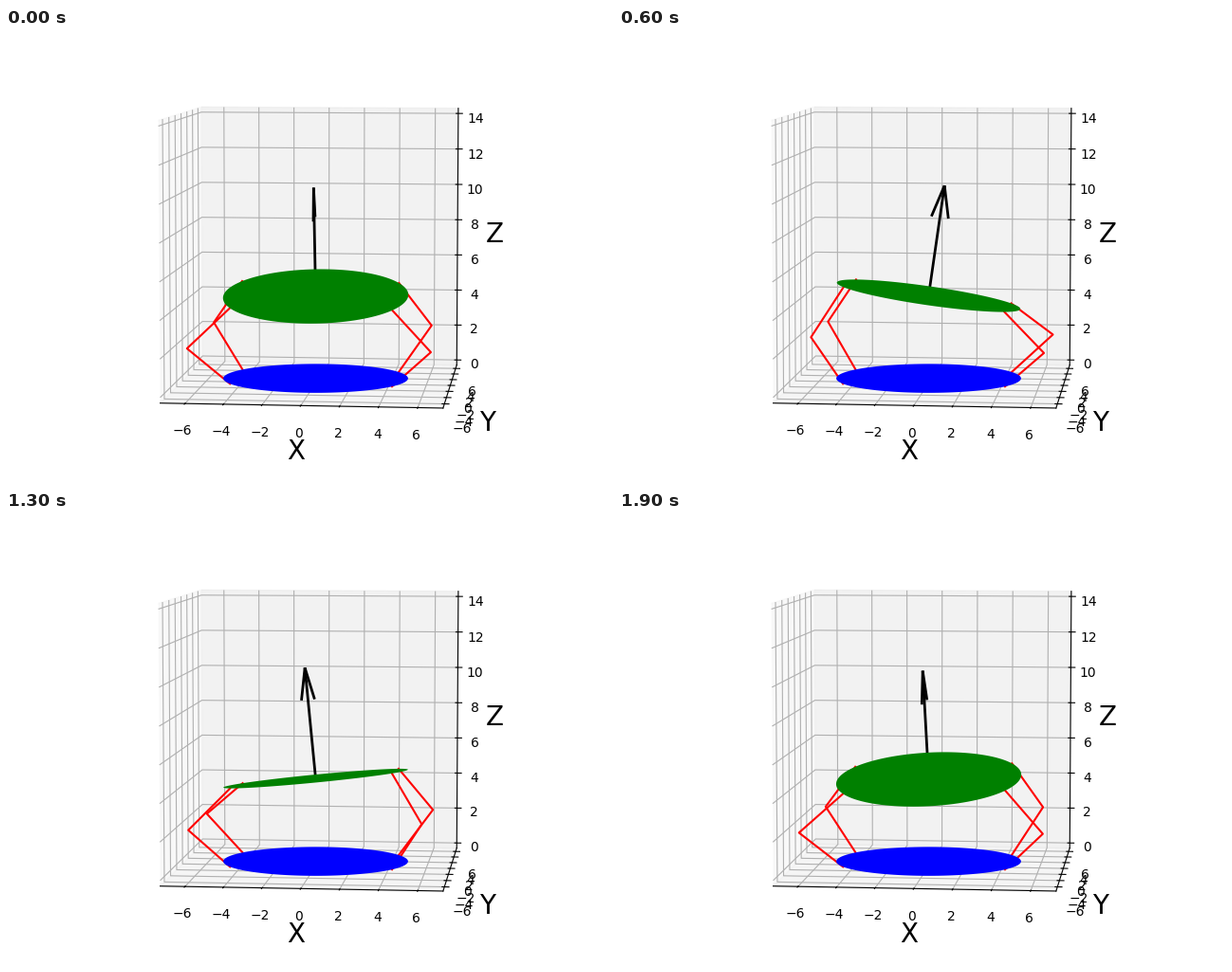
Recreate the animation shown at these times as a matplotlib script. Size 640 by 480 pixels, loop 2000 ms.

```python
import numpy as np
import matplotlib.pyplot as plt
from matplotlib.animation import FuncAnimation
from mpl_toolkits.mplot3d.art3d import Poly3DCollection

RADIUS = 5
HEIGHT = 4.5
LINK = HEIGHT / np.sqrt(2)
LIMIT = 7
MARGIN = 2 * LIMIT / 48
TOP = np.array([0, 0, HEIGHT])
LEG_ANGLES = np.radians([30, 150, 210, 330])

# Tilt in degrees: lean towards +x and towards -y, one value per frame
fast = np.linspace(0, 10, 5)
fall = np.arange(10, -10, -2)
rise = np.arange(-10, 0, 2)
LEAN_X = np.radians(np.concatenate([fast, fall, rise]))
LEAN_Y = np.radians(np.concatenate([fall, rise, fast]))


def ring(angles):
    return RADIUS * np.column_stack(
        [np.cos(angles), np.sin(angles), np.zeros_like(angles)])


def rotation(i):
    cx, sx = np.cos(LEAN_Y[i]), np.sin(LEAN_Y[i])
    cy, sy = np.cos(LEAN_X[i]), np.sin(LEAN_X[i])
    about_x = np.array([[1, 0, 0], [0, cx, -sx], [0, sx, cx]])
    about_y = np.array([[cy, 0, sy], [0, 1, 0], [-sy, 0, cy]])
    return about_x @ about_y


def knee(foot, head):
    """Joint of two equal links that bends outwards from the centre."""
    span = head - foot
    length = np.linalg.norm(span)
    axis = span / length
    out = foot / RADIUS
    out = out - (out @ axis) * axis
    out /= np.linalg.norm(out)
    return (foot + head) / 2 + out * np.sqrt(LINK**2 - length**2 / 4)


disc = ring(np.linspace(0, 2 * np.pi, 120, endpoint=False))
feet = ring(LEG_ANGLES)

fig = plt.figure(figsize=(6.4, 4.8), dpi=100)
ax = fig.add_axes([0, 0, 1, 1], projection='3d', computed_zorder=False)
ax.set_box_aspect((1, 1, 1))
ax.view_init(elev=6, azim=-84)

legs = [ax.plot([0], [0], [0], color='red', zorder=3)[0] for _ in feet]
base = Poly3DCollection([disc], facecolors='blue', zorder=5)
platform = Poly3DCollection([disc + TOP], facecolors='green', zorder=6)
ax.add_collection3d(base)
ax.add_collection3d(platform)

ax.set_xlim(-LIMIT - MARGIN, LIMIT + MARGIN)
ax.set_ylim(-LIMIT - MARGIN, LIMIT + MARGIN)
ax.set_zlim(-MARGIN, 2 * LIMIT + MARGIN)
ax.set_xticks(range(-6, 7, 2))
ax.set_yticks(range(-6, 7, 2))
ax.set_zticks(range(0, 15, 2))
ax.set_xlabel('X', fontsize=20)
ax.set_ylabel('Y', fontsize=20)
ax.set_zlabel('Z', fontsize=20)

arrow = None


def update(i):
    global arrow
    turn = rotation(i)
    platform.set_verts([disc @ turn.T + TOP])
    for leg, foot in zip(legs, feet):
        head = turn @ foot + TOP
        leg.set_data_3d(*np.array([foot, knee(foot, head), head]).T)
    if arrow is not None:
        arrow.remove()
    arrow = ax.quiver(*TOP, *turn[:, 2], length=6, color='black',
                      linewidth=2, zorder=4)
    return [platform, arrow, *legs]


anim = FuncAnimation(fig, update, frames=20, interval=100, repeat=True,
                     repeat_delay=0, blit=False)
plt.show()
```
